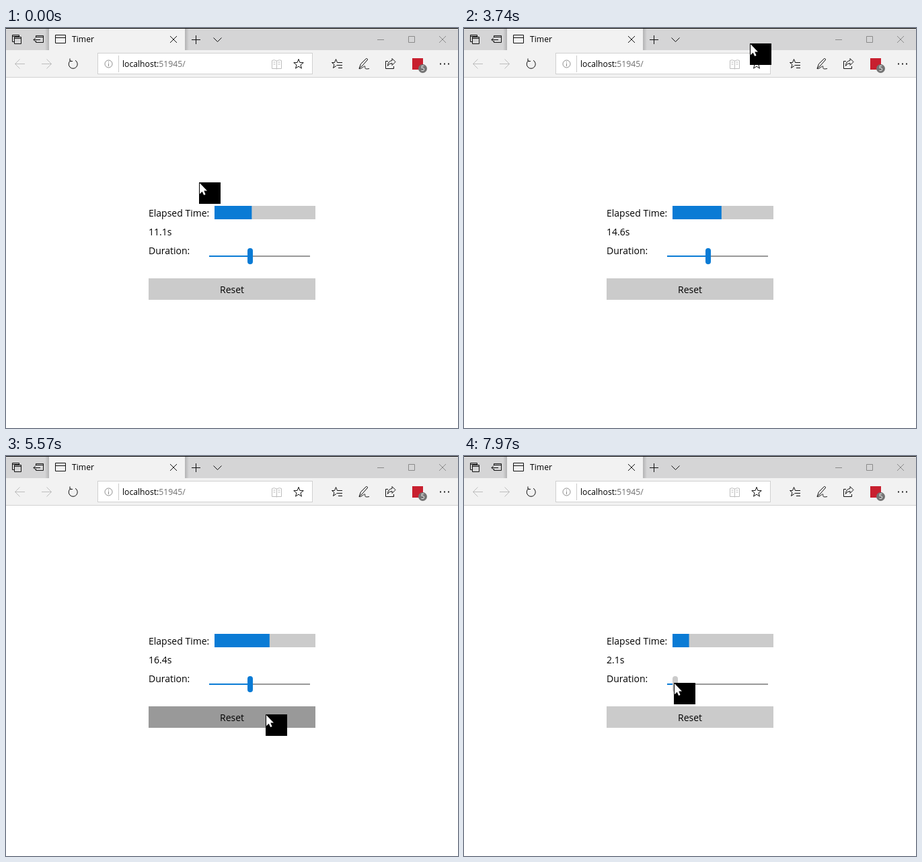
These frames come from a looping animation (672 by 596 pixels, 8 s). An HTML page:

```html
<!DOCTYPE html>
<html lang="en">
<head>
<meta charset="utf-8">
<title>Timer</title>
<style>
  html, body { margin: 0; width: 100%; height: 100%; overflow: hidden; background: #fff; }
  svg { display: block; width: 672px; height: 596px; }
  text { font-family: "Open Sans", "Noto Sans", sans-serif; font-size: 14px; fill: #000; }
  .small { font-size: 12.2px; }
  .line { fill: none; stroke: #111; stroke-width: 1; }
  .dim { stroke: #8a8a8a; }
  .pale { stroke: #bdbdbd; }
</style>
</head>
<body>
<svg viewBox="0 0 672 596">
  <defs>
    <linearGradient id="shade">
      <stop offset="0" stop-color="#000" stop-opacity="0"/>
      <stop offset="1" stop-color="#000" stop-opacity=".16"/>
    </linearGradient>
  </defs>

  <!-- title bar -->
  <rect width="672" height="33" fill="#d5d5d6"/>
  <rect x="58" y="1" width="6" height="32" fill="url(#shade)"/>
  <rect x="266" y="1" width="6" height="32" fill="url(#shade)" transform="matrix(-1 0 0 1 538 0)"/>
  <rect y="33" width="672" height="40" fill="#f2f2f2"/>
  <rect x="64" y="1" width="202" height="32" fill="#f2f2f2"/>
  <rect width="672" height="1" fill="#000"/>
  <rect y="73" width="672" height="1" fill="#d2d2d2"/>
  <g class="line">
    <path d="M12.5 20.5H9.500V10.500H19.500V13M9.500 12.500H19.500M12.500 13.500H22.500V23.500H12.500ZM12.500 15.500H22.500"/>
    <path d="M44.500 14V11.500H55.500V21.500H44.500V19M44.500 13.500H55.500M41 17.500H51M44 14.500L41 17.500L44 20.500"/>
    <path d="M73.500 10.500H88.500V22.500H73.500ZM73.500 14.500H88.500"/>
    <path d="M244 12L254 22M254 12L244 22M282.500 11V24M276 17.500H289M308.500 14.500L314.500 20.500L320.500 14.500"/>
  </g>
  <path class="line dim" d="M552 17.500H562M598.500 12.500H607.500V21.500H598.500ZM644 12L654 22M654 12L644 22"/>
  <text class="small" x="98" y="21">Timer</text>

  <!-- toolbar -->
  <path class="line pale" d="M28 53.500H13.500M20.500 46.500L13.500 53.500L20.500 60.500M53 53.500H67.500M60.500 46.500L67.500 53.500L60.500 60.500"/>
  <path class="line" stroke-width="1.200" d="M96 48.500A6.500 6.500 0 1 0 103 48.200M95 45.500V49.500H99"/>
  <rect x="136.500" y="37.500" width="319" height="31" fill="#fff" stroke="#d0d0d0"/>
  <path class="line" style="stroke:#ccc" d="M167.500 41V66"/>
  <g class="line dim">
    <circle cx="152.500" cy="53.500" r="5.500"/>
    <path d="M152.500 52.500V57M152.500 50V51.200"/>
  </g>
  <text class="small" x="173" y="58">localhost:<tspan fill="#6d6d6d">51945/</tspan></text>
  <path class="line pale" d="M402.500 49V61.500M402.500 49Q398 46.500 395.500 48.500V60.500H409.500V48.500Q407 46.500 402.500 49M397.500 51H400.500M397.500 54H400.500M404.500 51H407.500M404.500 54H407.500"/>
  <path class="line" id="star"/>
  <path class="line" d="M490.500 46.500L492.500 51.500H500M490.500 46.500L488.500 51.500H484.500L488 54.500L486.500 59.500L491 56.500M491.500 55.500H500M494 59.500H500"/>
  <path class="line" d="M525 60.500L527.500 53.500L535.500 45.500Q538.500 45.500 537 48L529 57Q524.500 60.500 525 60.500C528 62 533 55 534 57.500C533 61 535 61.500 540 60.500"/>
  <path class="line" d="M568 49.500H564.500V60.500H576.500V57M574 45.500L579 50.500L574 55.500V52.500Q569 52.500 567.500 56.500Q567.500 49.500 574 48.500Z"/>
  <rect x="604" y="45" width="16" height="17" fill="#c8202f"/>
  <circle cx="619.500" cy="60.500" r="6.500" fill="#747474"/>
  <text x="619.500" y="64.200" text-anchor="middle" style="font-size:10px;fill:#fff">5</text>
  <path d="M645 52.500h2v2h-2zM651 52.500h2v2h-2zM657 52.500h2v2h-2z" fill="#222"/>

  <!-- page -->
  <text x="212" y="281">Elapsed Time:</text>
  <rect x="310" y="265" width="150" height="20" fill="#cbcbcb"/>
  <rect id="bar" x="310" y="265" height="20" fill="#0a7bd5"/>
  <text id="time" x="212" y="309"></text>
  <text x="212" y="337">Duration:</text>
  <rect x="302" y="339" width="150" height="2" fill="#999"/>
  <rect id="fill" x="302" y="339" height="2" fill="#0a7bd5"/>
  <rect id="thumb" y="328" width="8" height="24" rx="4"/>
  <rect id="button" x="212" y="373" width="248" height="32"/>
  <text x="336" y="395" text-anchor="middle">Reset</text>

  <g id="cursor">
    <rect width="32" height="32"/>
    <path d="M1 1V17.200L4.700 13.700L7.200 19L9.600 18L7.300 12.500H12Z" fill="#fff"/>
  </g>
</svg>
<script>
const LOOP = 8000, RESET = 5590, PRESS = 5480, GRAB = 7000;
const $ = id => document.getElementById(id);
const clamp = (v, lo, hi) => Math.min(hi, Math.max(lo, v));

// pointer path: time, x, y
const path = [
  [0, 287, 230], [100, 289, 235], [830, 346, 368], [1070, 354, 390],
  [1430, 358, 401], [1570, 358, 401], [2000, 361, 427], [2340, 363, 415],
  [2480, 366, 420], [3100, 391, 465], [3240, 392, 465], [3740, 425, 23],
  [4030, 388, 9], [4120, 387, 14], [4700, 386, 400], [4840, 384, 408],
  [5050, 385, 420], [5420, 386, 387], [5600, 386, 385], [5710, 387, 365],
  [6270, 387, 353], [6500, 397, 351], [6900, 362, 343], [GRAB, 361, 342],
  [7900, 312, 338], [LOOP, 312, 338]
];

const slope = (i, k) => (path[i + 1][k] - path[i][k]) / (path[i + 1][0] - path[i][0]);

// slope at a point, flat at turning points
function tangent(i, k) {
  if (i === 0 || i === path.length - 1) return 0;
  const a = slope(i - 1, k), b = slope(i, k);
  return a * b <= 0 ? 0 : 2 * a * b / (a + b);
}

function pointer(t, k) {
  let i = 0;
  while (i < path.length - 2 && t >= path[i + 1][0]) i++;
  const [p, q] = [path[i], path[i + 1]];
  const h = q[0] - p[0], u = (t - p[0]) / h, v = 1 - u;
  return p[k] * (1 + 2 * u) * v * v + q[k] * u * u * (3 - 2 * u)
    + h * u * v * (v * tangent(i, k) - u * tangent(i + 1, k));
}

function draw(t) {
  const x = pointer(t, 1), y = pointer(t, 2);
  const dragging = t >= GRAB;
  const knob = dragging ? clamp(x + 2, 306, 448) : 363;
  const duration = 10 + 50 * (knob - 306) / 142;
  const elapsed = t < RESET
    ? 11.1 + Math.floor(t / 105) / 10
    : Math.floor((t - RESET) / 110) / 10;

  $("bar").setAttribute("width", 150 * clamp(elapsed / duration, 0, 1));
  $("time").textContent = elapsed.toFixed(1) + "s";
  $("fill").setAttribute("width", knob - 302);
  $("thumb").setAttribute("x", knob - 4);
  $("thumb").setAttribute("fill", dragging ? "#cbcbcb" : "#0a7bd5");
  $("button").setAttribute("fill", t >= PRESS && t < RESET ? "#999" : "#cbcbcb");
  $("cursor").setAttribute("transform", `translate(${Math.round(x)} ${Math.round(y)})`);
}

const star = Array.from({ length: 10 }, (_, i) => {
  const a = i * Math.PI / 5, r = i % 2 ? 3.2 : 7.6;
  return `${435 + r * Math.sin(a)} ${54 - r * Math.cos(a)}`;
});
$("star").setAttribute("d", `M${star.join("L")}Z`);

const start = performance.now();
function tick() {
  draw((performance.now() - start) % LOOP);
  requestAnimationFrame(tick);
}
tick();
</script>
</body>
</html>
```
